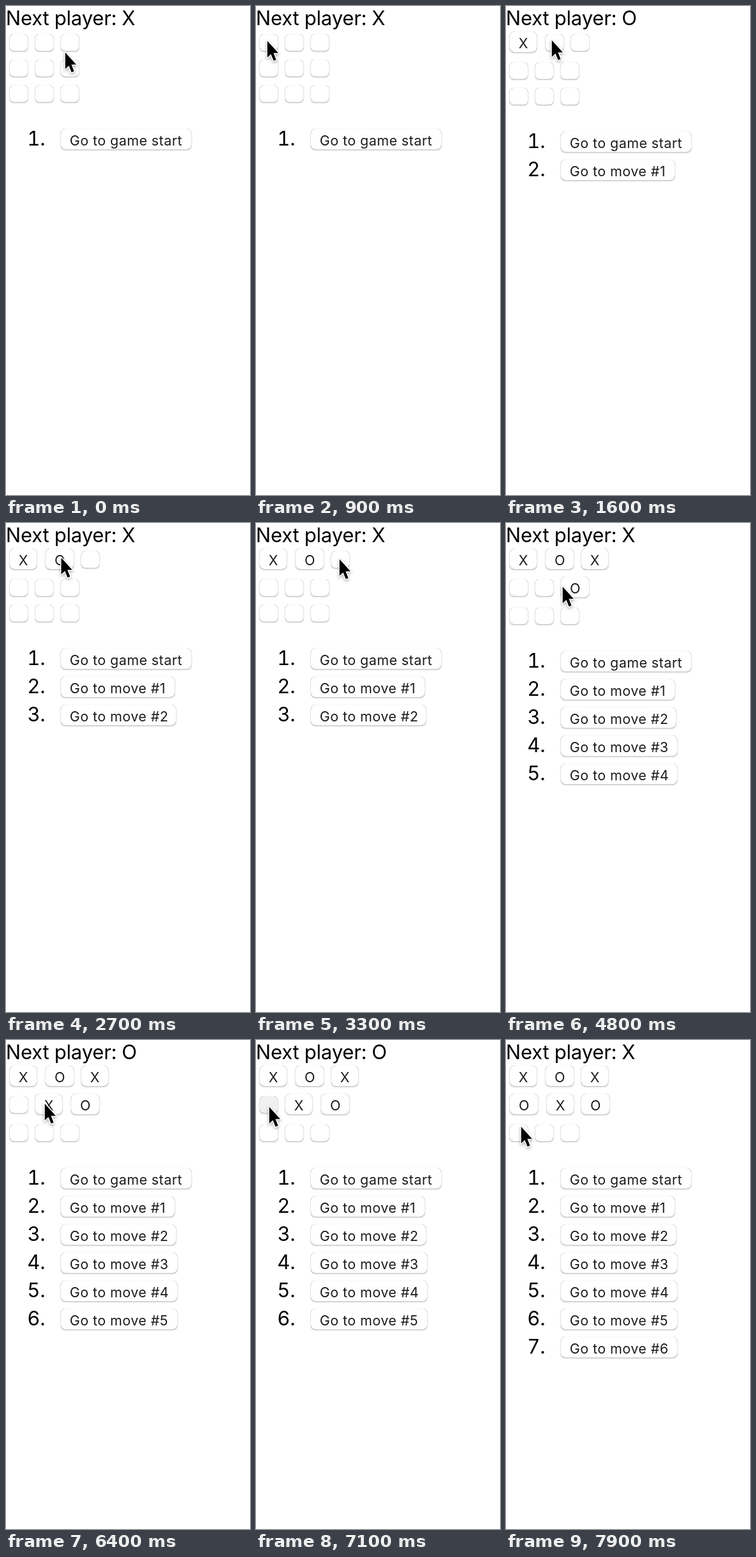
Write an HTML page that moves like this. It is 382x764 px and loops after 8000 ms.

```html
<!DOCTYPE html>
<html lang="en">
<head>
<meta charset="utf-8">
<title>Tic-tac-toe</title>
<style>
  html, body { margin: 0; width: 100%; height: 100%; overflow: hidden; background: #fff; }
  svg { display: block; width: 382px; height: 764px; }
  text { font: 31px Inter, sans-serif; letter-spacing: -.15px; font-variant-numeric: tabular-nums; white-space: pre; }
  .label { font-size: 21.5px; letter-spacing: .42px; font-variant-numeric: normal; fill: #1c1c1c; }
  rect { fill: #fff; filter: drop-shadow(0 0 .7px rgba(0,0,0,.5)) drop-shadow(0 1px .8px rgba(0,0,0,.32)); }
  .pressed { fill: #f0f0f0; }
  #cursor { filter: drop-shadow(0 2px 2px rgba(0,0,0,.3)); }
</style>
</head>
<body>
<svg viewBox="0 0 382 764">
  <g id="game"></g>
  <path id="cursor" d="M.7 1.5V27.5L6.4 22.2L10.6 32.6L14.6 30.9L10.4 20.6H18Z"
        stroke="#fff" stroke-width="3" stroke-linejoin="round" paint-order="stroke"/>
</svg>
<script>
const LOOP = 8000, STEP = 100, PRESS = 100;
const game = document.getElementById('game');
const cursor = document.getElementById('cursor');

// The cursor glides to (x, y) from depart to arrive; the cell is marked at release.
const start = { x: 92, y: 71 };
const moves = [
  { cell: 0, x: 17, y: 53, depart: 0, arrive: 900, release: 1100 },
  { cell: 1, x: 71, y: 52, depart: 1200, arrive: 1600, release: 2400 },
  { cell: 2, x: 130, y: 55, depart: 2500, arrive: 3300, release: 3600 },
  { cell: 5, x: 88, y: 98, depart: 3700, arrive: 4600, release: 4800, bend: 3 },
  { cell: 4, x: 68, y: 97, depart: 5100, arrive: 5500, release: 6000 },
  { cell: 3, x: 20, y: 103, depart: 6300, arrive: 6900, release: 7200 },
  { cell: 6, x: 23, y: 134, depart: 7300, arrive: 7900, release: 8400 }
];

const player = i => i % 2 ? 'O' : 'X';
const snapOdd = x => 2 * Math.round((x - 1) / 2) + 1;

const box = (x, y, w, h, r, pressed) =>
  `<rect x="${x + 1}" y="${y + 1}" width="${w - 2}" height="${h - 2}" rx="${r}"${pressed ? ' class="pressed"' : ''}/>`;
const text = (x, y, s, attrs = '') => `<text x="${x}" y="${y}" ${attrs}>${s}</text>`;

// Marked cells are larger than empty ones, so they push their neighbours along.
function cells(board, pressed) {
  let out = '', top = 39;
  for (let row = 0; row < 3; row++) {
    let left = 5;
    for (let col = 0; col < 3; col++) {
      const i = row * 3 + col, mark = board[i], x = snapOdd(left);
      if (mark) {
        const w = mark === 'X' ? 44 : 46;
        out += box(x, top, w, 34, 7) +
          text(x + w / 2 + .4, top + 27, mark, 'class="label" text-anchor="middle"');
        left += w + 11.2;
      } else {
        out += box(x, top + 4, 30, 28, 6, i === pressed);
        left += 40;
      }
    }
    top += board.slice(row * 3, row * 3 + 3).some(Boolean) ? 44 : 40;
  }
  return [out, top];
}

function history(count, top) {
  let out = '';
  for (let i = 0; i <= count; i++) {
    const y = top + 32 + i * 44;
    const width = i ? Math.min(178 + 2 * i, 184) : 206;
    out += text(61.5, y + 27, i + 1 + '.', 'text-anchor="end"') +
      box(85, y, width, 34, 7) +
      text(99.8, y + 27, i ? 'Go to move #' + i : 'Go to game start', 'class="label"');
  }
  return out;
}

let shown;
function drawGame(t) {
  const count = moves.findIndex(m => t < m.release);
  const next = moves[count];
  const pressed = t >= next.release - PRESS ? next.cell : -1;
  const state = count + ':' + pressed;
  if (state === shown) return;
  shown = state;
  const board = Array(9).fill('');
  moves.slice(0, count).forEach((m, i) => board[m.cell] = player(i));
  const [grid, bottom] = cells(board, pressed);
  game.innerHTML = text(-.3, 30, 'Next player: ' + player(count)) + grid + history(count, bottom);
}

function drawCursor(t) {
  const i = moves.filter(m => t >= m.depart).length - 1;
  const from = moves[i - 1] || start, to = moves[i], bend = to.bend || 1;
  const k = Math.min(1, (t - to.depart) / (to.arrive - to.depart));
  const x = from.x + (to.x - from.x) * k ** bend;
  const y = from.y + (to.y - from.y) * (1 - (1 - k) ** bend);
  cursor.setAttribute('transform', `translate(${x} ${y})`);
}

function frame() {
  const t = Math.floor(performance.now() % LOOP / STEP) * STEP;
  drawGame(t);
  drawCursor(t);
  requestAnimationFrame(frame);
}
frame();
</script>
</body>
</html>
```
